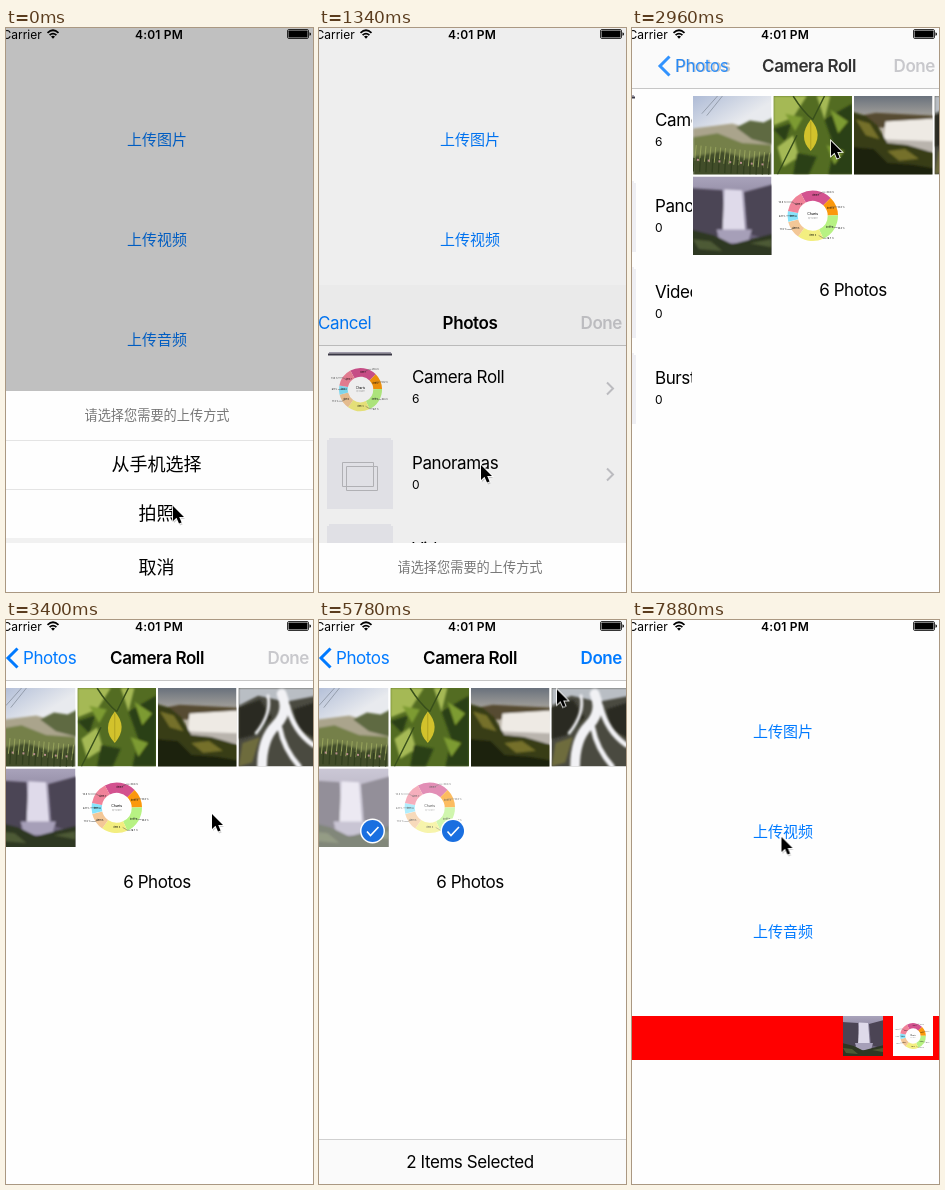
Write an HTML page that moves like this. It is 307 px wide and 564 px high and loops after 8 s.

```html
<!DOCTYPE html>
<html lang="zh">
<head>
<meta charset="utf-8">
<title>Photo upload</title>
<style>
html, body { margin: 0; width: 307px; height: 564px; overflow: hidden; background: #fefefe; }
svg.stage { display: block; }
text { font: 17px Inter, "Open Sans", sans-serif; letter-spacing: -.41px; }
.bold { font-weight: 600; }
.mid { text-anchor: middle; }
.end { text-anchor: end; }
.small { font-size: 12px; letter-spacing: 0; }
.cjk text { font-family: "Noto Sans CJK SC", "Noto Sans CJK", sans-serif; letter-spacing: 0; text-anchor: middle; }
.links text { font-size: 15px; fill: #007aff; }
.sheet text { font-size: 18px; }
.sheet .hint { font-size: 13.2px; fill: #777; }
.tiny text { font-size: 2.4px; letter-spacing: 0; text-anchor: middle; }
.blue { fill: #007aff; }

.modal, .dim, .sheet, .cursor, .list, .grid, .nav-list, .nav-grid, .done, .bar, .pick, .one, .two {
  animation: 8s step-end infinite;
}
.modal { animation-name: modal; }
.dim { animation-name: dim; }
.sheet { animation-name: sheet; }
.cursor { animation-name: cursor; }
.list { animation-name: list; }
.grid { animation-name: grid; }
.nav-list { animation-name: nav-list; }
.nav-grid { animation-name: nav-grid; }
.done { animation-name: done; }
.bar { animation-name: bar; }
.pick { opacity: 0; animation-name: pick; }
.one { animation-name: one; }
.two { opacity: 0; animation-name: two; }

@keyframes modal {
  0% { transform: translateY(564px); }
  14.875% { transform: translateY(500px); }
  16.75% { transform: translateY(257px); }
  18.5% { transform: translateY(70px); }
  20.375% { transform: translateY(14px); }
  22.25% { transform: none; }
  79.75% { transform: translateY(376px); }
  81.625% { transform: translateY(520px); }
  83.5%, to { transform: translateY(564px); }
}
@keyframes dim {
  0% { opacity: .245; }
  14.875% { opacity: .21; }
  16.75% { opacity: .063; }
  18.5%, to { opacity: 0; }
}
@keyframes sheet {
  0% { transform: none; }
  14.875% { transform: translateY(30px); }
  16.75% { transform: translateY(152px); }
  18.5%, to { transform: translateY(202px); }
}
@keyframes list {
  0% { transform: none; }
  35.125% { transform: translateX(-23px); }
  37% { transform: translateX(-70px); }
  38.875%, to { transform: translateX(-90px); }
}
@keyframes grid {
  0% { transform: translateX(320px); }
  35.125% { transform: translateX(230px); }
  37% { transform: translateX(70px); }
  38.875% { transform: translateX(14px); }
  40.75%, to { transform: none; }
}
@keyframes nav-list {
  0% { opacity: 1; transform: none; }
  35.125% { opacity: .7; transform: translateX(-26px); }
  37% { opacity: .2; transform: translateX(-80px); }
  38.875%, to { opacity: 0; transform: translateX(-100px); }
}
@keyframes nav-grid {
  0% { opacity: 0; transform: translateX(120px); }
  35.125% { opacity: .25; transform: translateX(86px); }
  37% { opacity: .8; transform: translateX(26px); }
  38.875% { opacity: .95; transform: translateX(5px); }
  40.75%, to { opacity: 1; transform: none; }
}
@keyframes done {
  0% { fill: #c8c8cc; }
  50% { fill: #007aff; }
  76%, to { fill: #78b6fa; }
}
@keyframes bar {
  0% { transform: translateY(46px); }
  50% { transform: translateY(30px); }
  51.875% { transform: translateY(7px); }
  53.75%, to { transform: none; }
}
@keyframes pick { 50%, to { opacity: 1; } }
@keyframes one { 62.875%, to { opacity: 0; } }
@keyframes two { 62.875%, to { opacity: 1; } }
@keyframes cursor {
  0%, 5.65% { transform: translate(167px, 478px); animation-timing-function: steps(4); }
  13.05%, 20.375% { transform: translate(162px, 437px); animation-timing-function: steps(7); }
  33.25%, 38.875% { transform: translate(199px, 113px); animation-timing-function: steps(2); }
  42.5% { transform: translate(206px, 194px); animation-timing-function: steps(2); }
  46.25%, 53.65% { transform: translate(125px, 190px); animation-timing-function: steps(3); }
  59.125%, 62.875% { transform: translate(48px, 187px); animation-timing-function: steps(6); }
  74.125%, 79.75% { transform: translate(276px, 46px); animation-timing-function: steps(3); }
  85.375%, 87.25% { transform: translate(196px, 243px); animation-timing-function: steps(6); }
  98.5%, to { transform: translate(149.5px, 217px); }
}
</style>
</head>
<body>
<svg class="stage" width="307" height="564" viewBox="0 0 307 564">
<defs>
  <linearGradient id="haze" x2=".6" y2="1"><stop stop-color="#aebbd6"/><stop offset=".5" stop-color="#e8eaee"/></linearGradient>
  <linearGradient id="dusk" x2="0" y2="1"><stop stop-color="#69717c"/><stop offset=".35" stop-color="#b9b2a6"/></linearGradient>
  <linearGradient id="lilac" x2="0" y2="1"><stop stop-color="#a9a3bb"/><stop offset="1" stop-color="#564d66"/></linearGradient>
  <filter id="soft"><feGaussianBlur stdDeviation="1.3"/></filter>

  <symbol id="dune" viewBox="0 0 80 80">
    <path fill="url(#haze)" d="M0 0H80V80H0Z"/>
    <path stroke="#7f8894" stroke-width=".7" d="M9 18 25 0M14 20 30 0"/>
    <g filter="url(#soft)">
      <path fill="#aaa48c" d="M0 33 40 28 80 40V80H0Z"/>
      <path fill="#5f6a42" d="M44 32 58 25 72 27 82 22V50L60 44Z"/>
      <path fill="#75804a" d="M0 42 25 38 50 48 80 50V82H0Z"/>
      <path fill="#424e2a" d="M0 62 30 56 55 64 80 58V82H0Z"/>
    </g>
    <path stroke="#97a35c" stroke-width="16" stroke-dasharray="1 4" d="M2 58 80 66"/>
    <path stroke="#33401f" stroke-width="14" stroke-dasharray="1.4 5" d="M0 70 80 74"/>
    <path stroke="#b78e8c" stroke-width="2" stroke-dasharray="2 9" d="M4 65 76 70"/>
  </symbol>

  <symbol id="leaf" viewBox="0 0 80 80">
    <path fill="#536c22" d="M0 0H80V80H0Z"/>
    <g filter="url(#soft)">
      <path fill="#a5b955" d="M0 0H34L20 22 0 30ZM44 0H58L52 24ZM4 52 20 40 26 62 10 72Z"/>
      <path fill="#2c3f15" d="M52 24 80 8V80H56L62 52ZM0 34 18 28 12 46ZM24 58 44 62 36 80H20Z"/>
      <path fill="#7d9b31" d="M58 14 76 26 66 38ZM54 50 72 56 62 70ZM12 18 30 22 22 36Z"/>
    </g>
    <path stroke="#39501b" stroke-width="1.5" fill="none" d="M20 0Q30 16 40 24M52 0 40 24M4 80 24 40"/>
    <path fill="#d2c22c" d="M38 24Q52 40 38 56 24 42 38 24Z"/>
    <path stroke="#a99b1e" stroke-width=".8" d="M38 26V54"/>
  </symbol>

  <symbol id="falls" viewBox="0 0 80 80">
    <path fill="url(#dusk)" d="M0 0H80V80H0Z"/>
    <g filter="url(#soft)">
      <path fill="#574b33" d="M-2 22 22 17 82 20V32H-2Z"/>
      <path fill="#eeeae4" d="M32 26 82 23V50H30Z"/>
      <path fill="#b9b4ad" d="M28 44 82 46V56H28Z"/>
      <path fill="#383d14" d="M-2 16 12 20 24 30 34 48 54 50 82 58V82H-2Z"/>
      <path fill="#74702a" d="M2 24 16 28 26 44 12 40ZM34 56 52 54 66 64 46 66Z"/>
      <path fill="#1c2010" d="M-2 52 20 54 34 68 60 70 82 74V82H-2Z"/>
    </g>
  </symbol>

  <symbol id="cascade" viewBox="0 0 80 80">
    <path fill="#4a4a40" d="M0 0H80V80H0Z"/>
    <g filter="url(#soft)">
      <path fill="#b9bec4" d="M0 0H80V8L48 14 20 8 0 18Z"/>
      <path fill="#2a2c22" d="M0 20 22 12 34 30 16 48 0 52ZM56 22 80 14V52L60 42Z"/>
      <path fill="#6e6c3d" d="M4 56 22 50 14 76 0 80Z"/>
    </g>
    <g fill="none" stroke="#f1f1f4" stroke-linecap="round" filter="url(#soft)">
      <path stroke-width="10" d="M44 6Q52 24 38 38T24 80"/>
      <path stroke-width="5" d="M50 18Q56 44 76 58M42 40Q46 62 62 80"/>
      <path stroke-width="3" d="M30 8Q34 26 18 46"/>
    </g>
  </symbol>

  <symbol id="plunge" viewBox="0 0 80 80">
    <path fill="url(#lilac)" d="M0 0H80V80H0Z"/>
    <g filter="url(#soft)">
      <path fill="#4b4454" d="M-2 12 30 14 34 58-2 66ZM52 16 82 8V66L56 58Z"/>
      <path fill="#dfdaea" d="M32 13 50 14 54 60 40 66 30 58Z"/>
      <path fill="#a69fb8" d="M24 54 60 54 56 68 28 68Z"/>
      <path fill="#2e3723" d="M-2 54 22 60 40 69 82 58V82H-2Z"/>
      <path fill="#4e5a35" d="M0 64 18 66 30 76 6 74ZM58 68 80 64V72Z"/>
    </g>
  </symbol>

  <symbol id="chart" viewBox="0 0 80 80">
    <path fill="#fefefe" d="M0 0H80V80H0Z"/>
    <g fill="none" stroke-width="10.5" transform="translate(40 40)">
      <circle r="20.5" pathLength="360" stroke="#d3528f" stroke-dasharray="73 287" transform="rotate(-118)"/>
      <circle r="20.5" pathLength="360" stroke="#fb980c" stroke-dasharray="44 316" transform="rotate(-45)"/>
      <circle r="20.5" pathLength="360" stroke="#b7f283" stroke-dasharray="66 294" transform="rotate(-1)"/>
      <circle r="20.5" pathLength="360" stroke="#f3ee80" stroke-dasharray="60 300" transform="rotate(65)"/>
      <circle r="20.5" pathLength="360" stroke="#f3c797" stroke-dasharray="41 319" transform="rotate(125)"/>
      <circle r="20.5" pathLength="360" stroke="#86e3fb" stroke-dasharray="25 335" transform="rotate(166)"/>
      <circle r="20.5" pathLength="360" stroke="#f08399" stroke-dasharray="51 309" transform="rotate(191)"/>
    </g>
    <path fill="none" stroke="#555" stroke-width=".5" d="M44 19 50 16H53M58 31H65M57 50 62 52H65M46 60 51 63H54M22 52 18 54H14M21 40H13M24 29 19 26H13"/>
    <g class="tiny">
      <text x="40" y="39" font-weight="bold" style="font-size:3.6px">Charts</text>
      <text x="40" y="43" fill="#999">by share</text>
      <text x="43" y="20">Item 1</text><text x="58" y="33">Item 2</text>
      <text x="57" y="52">Item 3</text><text x="40" y="61">Item 4</text>
      <text x="23" y="53">Item 5</text><text x="20" y="41">Item 6</text><text x="26" y="29">Item 7</text>
      <text x="58" y="17">20.3 %</text><text x="69" y="32">12.2 %</text>
      <text x="69" y="53">18.3 %</text><text x="58" y="64">16.7 %</text>
      <text x="10" y="55">11.4 %</text><text x="9" y="41">6.9 %</text><text x="9" y="27">14.2 %</text>
    </g>
  </symbol>

  <g id="album">
    <path fill="#efeff4" d="M10 153H72V155H74V224H8V155H10Z"/>
    <path fill="#efeff4" stroke="#bcbcc0" d="M23.5 177.5H54.5V201.5H23.5ZM27.5 181.5H58.5V205.5H27.5Z"/>
  </g>
  <path id="more" fill="none" stroke="#c7c7cc" stroke-width="2" d="M288 97.5 294 103.5 288 109.5"/>
  <g id="check">
    <circle r="12.5" fill="#fff"/>
    <circle r="11" fill="#1a6fe0"/>
    <path fill="none" stroke="#fff" stroke-width="1.6" d="M-5.5 .5-2 4.5 6-4"/>
  </g>
</defs>

<rect width="307" height="564" fill="#fefefe"/>
<g class="cjk links">
  <text x="151" y="116.5">上传图片</text>
  <text x="151" y="216.5">上传视频</text>
  <text x="151" y="316.5">上传音频</text>
</g>
<rect y="396" width="307" height="44" fill="#f00"/>
<use href="#plunge" x="211" y="396" width="40" height="40"/>
<use href="#chart" x="261" y="396" width="40" height="40"/>

<g class="modal">
  <rect width="307" height="564" fill="#fefefe"/>
  <g class="list">
    <rect x="10" y="67" width="62" height="1.5" fill="#a8a4b4"/>
    <rect x="9" y="68.5" width="64" height="2" fill="#3d3b48"/>
    <use href="#chart" x="8" y="71" width="67" height="67"/>
    <use href="#album"/><use href="#album" y="86"/><use href="#album" y="172"/>
    <use href="#more"/><use href="#more" y="86"/><use href="#more" y="172"/><use href="#more" y="258"/>
    <text x="93" y="98">Camera Roll</text><text class="small" x="93" y="117.5">6</text>
    <text x="93" y="184">Panoramas</text><text class="small" x="93" y="203.5">0</text>
    <text x="93" y="270">Videos</text><text class="small" x="93" y="289.5">0</text>
    <text x="93" y="356">Bursts</text><text class="small" x="93" y="375.5">0</text>
  </g>

  <g class="grid">
    <rect x="-10" y="60" width="330" height="504" fill="#fefefe"/>
    <use href="#dune" x="-9" y="68" width="78.5" height="78.5"/>
    <use href="#leaf" x="71.5" y="68" width="78.5" height="78.5"/>
    <use href="#falls" x="152" y="68" width="78.5" height="78.5"/>
    <use href="#cascade" x="232.5" y="68" width="78.5" height="78.5"/>
    <use href="#plunge" x="-9" y="148.5" width="78.5" height="78.5"/>
    <use href="#chart" x="71.5" y="148.5" width="78.5" height="78.5"/>
    <g class="pick">
      <rect x="71.5" y="148.5" width="78.5" height="78.5" fill="#fff" opacity=".35"/>
      <use href="#check" x="134" y="211"/>
    </g>
    <g class="two">
      <rect x="-9" y="148.5" width="78.5" height="78.5" fill="#fff" opacity=".4"/>
      <use href="#check" x="53.5" y="211"/>
    </g>
    <text class="mid" x="151" y="268">6 Photos</text>
  </g>

  <g class="bar">
    <rect y="519" width="307" height="45" fill="#fafafa"/>
    <rect y="519" width="307" height="1" fill="#d0d0d0"/>
    <text class="mid one" x="151" y="548">1 Item Selected</text>
    <text class="mid two" x="151" y="548">2 Items Selected</text>
  </g>

  <rect width="307" height="60" fill="#fafafa"/>
  <rect y="60" width="307" height="1" fill="#c6c6c6"/>
  <g class="nav-list">
    <text class="blue" x="-1" y="44">Cancel</text>
    <text class="bold mid" x="151" y="44">Photos</text>
  </g>
  <g class="nav-grid">
    <path fill="none" stroke="#007aff" stroke-width="3" d="M11.5 28.5 2 38 11.5 47.5"/>
    <text class="blue" x="17" y="44">Photos</text>
    <text class="bold mid" x="151" y="44">Camera Roll</text>
  </g>
  <text class="bold end done" x="303" y="44">Done</text>
</g>

<g>
  <text class="small" x="-3.5" y="10.5">Carrier</text>
  <g fill="none" stroke="#000" stroke-width="1.8">
    <path d="M41.5 4.8Q47 -.2 52.5 4.8M43.6 7.2Q47 4 50.4 7.2"/>
    <path fill="#000" stroke="none" d="M45 8.6Q47 6.8 49 8.6L47 10.8Z"/>
  </g>
  <text class="small bold mid" x="153" y="10.5" style="letter-spacing:.2px">4:01 PM</text>
  <rect x="281.5" y="1.5" width="21" height="9" rx="1.5" fill="none" stroke="#000" stroke-width=".8"/>
  <rect x="282.5" y="2.5" width="19" height="7" rx=".7"/>
  <path d="M303.5 4.2Q305 4.6 305 6T303.5 7.8Z"/>
</g>

<rect class="dim" width="307" height="564"/>

<g class="sheet cjk">
  <rect y="363" width="307" height="201" fill="#fefefe"/>
  <path fill="#e4e4e4" d="M0 412H307V413H0ZM0 461H307V462H0Z"/>
  <rect y="510" width="307" height="5" fill="#f1f1f1"/>
  <text class="hint" x="151" y="392">请选择您需要的上传方式</text>
  <text x="150.5" y="443">从手机选择</text>
  <text x="150.5" y="492">拍照</text>
  <text x="150.5" y="546">取消</text>
</g>

<g class="cursor">
  <path fill="#000" opacity=".18" transform="translate(1 2)" d="M0 0V15L3.5 11.8 6 17.5 8.6 16.4 6.2 11H11Z"/>
  <path stroke="#fff" stroke-width="1.6" paint-order="stroke" d="M0 0V15L3.5 11.8 6 17.5 8.6 16.4 6.2 11H11Z"/>
</g>
</svg>
</body>
</html>
```
